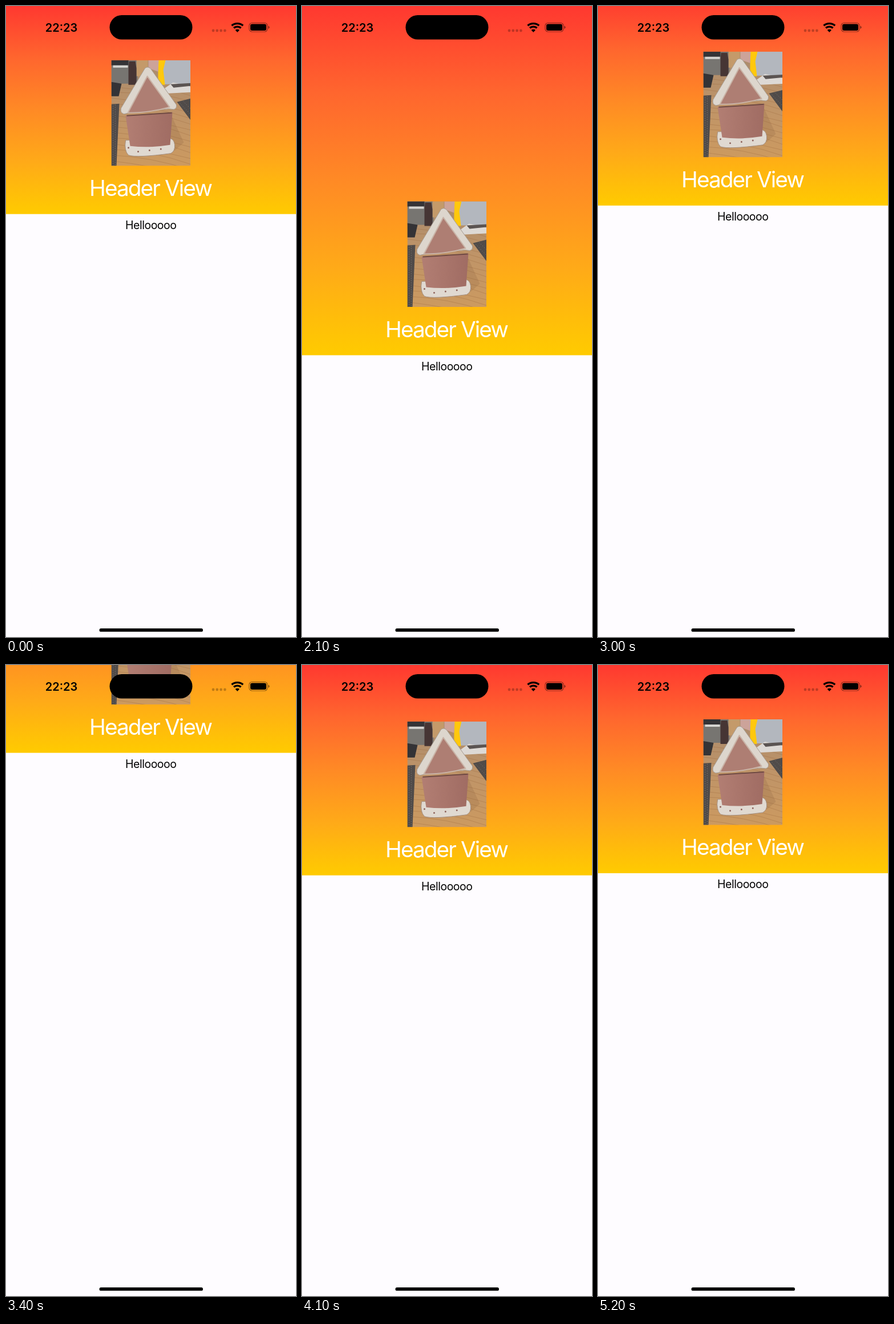
An HTML page for the animation above (5.3 s loop, 508 px wide and 1103 px high).

```html
<!DOCTYPE html>
<html lang="en">
<head>
<meta charset="utf-8">
<title>Stretchy header</title>
<style>
  html, body { margin: 0; width: 100%; height: 100%; overflow: hidden; background: #fefcff; }
  svg { display: block; width: 508px; height: 1103px; }
  text { font-family: Inter, "Liberation Sans", sans-serif; text-anchor: middle; }
  .title { font-size: 38.8px; fill: #fff; letter-spacing: -.05em; }
  .body { font-size: 19.5px; letter-spacing: -.025em; }
  .clock { font-size: 20px; font-weight: 600; }
</style>
</head>
<body>
<svg viewBox="0 0 508 1103">
  <defs>
    <linearGradient id="sunset" x2="0" y2="1">
      <stop stop-color="#ff3830"/><stop offset=".25" stop-color="#ff662e"/>
      <stop offset=".5" stop-color="#ff8a25"/><stop offset=".75" stop-color="#ffaa18"/>
      <stop offset="1" stop-color="#ffcb00"/>
    </linearGradient>
    <linearGradient id="wood" x2="0" y2="1">
      <stop stop-color="#a98a6c"/><stop offset=".5" stop-color="#bf9468"/><stop offset="1" stop-color="#cc9a60"/>
    </linearGradient>
    <linearGradient id="wall" x2="1" y2="0">
      <stop stop-color="#b27e73"/><stop offset="1" stop-color="#a06c63"/>
    </linearGradient>
    <clipPath id="crop"><path d="M0 0h138.5v184.5H0z"/></clipPath>
  </defs>

  <rect id="backdrop" width="508" fill="url(#sunset)"/>
  <g id="content">
    <g transform="translate(184.5 94.7)" clip-path="url(#crop)">
      <path fill="url(#wood)" d="M0 0h139v185H0z"/>
      <g id="grain" fill="none" stroke="#98663a" stroke-opacity=".35"/>
      <path fill="#777571" d="M0 0h46v41H0z"/>
      <path fill="#343336" d="M0 0h30v9H0zM0 38l18 3-5 22H0z"/>
      <path fill="#d5d4d0" d="M3 9h26v4H3z"/>
      <path fill="#c49a6a" d="M44 0h20v28H44z"/>
      <path fill="#b3b7be" d="M92 0h47v42H88z"/>
      <path fill="#ffc80d" d="M82 0h13l-4 17 3 26H82z"/>
      <path fill="#463534" d="M31 2h11l2 12v29H30V14z"/>
      <path fill="#ddd9d5" d="M92 50l16-11 31 7v10l-39 2z"/>
      <path fill="#5b5452" d="M104 42l35-2v5l-30 3z"/>
      <path fill="#504b49" d="M115 73l24-6v38zM0 77l14-1-5 109H0z"/>
      <path fill="none" stroke="#85807d" stroke-dasharray="1 3" d="M3 80v105M7 78v107M120 75l19 20M126 72l13 13"/>
      <path fill="#cca39a" d="M65 0h18l-1 20-17-6z"/>
      <path fill="#80593d" fill-opacity=".2" d="M105 96l22 48-16 14-8-10z"/>
      <path fill="#e0d9d1" stroke="#a38c7b" d="M25 140q-3 18 5 26 14 5 74-3 8-4 7-15-1-9-7-11z"/>
      <path fill="url(#wall)" d="M25 97l82-6-4 57q-36 6-70 2z"/>
      <path fill="none" stroke="#6f4a43" stroke-width="2" d="M27 97l79-5"/>
      <path fill="#ddd6cd" stroke="#a69b91" d="M59 14q5-4 10 1l45 63q1 7-5 8l-8-1-68 7-11 2q-7-2-5-10z"/>
      <path fill="#ae7e73" stroke="#c9b3a6" stroke-width="2" stroke-linejoin="round" d="M63 28l39 54q-34 10-73 10z"/>
      <path fill="none" stroke="#8d625b" stroke-width="3" stroke-linecap="round" stroke-dasharray="0 20" d="M30 153q2 8 16 7l60-7"/>
    </g>
    <text class="title" x="253" y="332">Header View</text>
    <text class="body" x="253.8" y="390">Hellooooo</text>
  </g>

  <text class="clock" x="97" y="45">22:23</text>
  <rect x="181.5" y="16" width="145" height="42.5" rx="21.25"/>
  <path stroke="#000" stroke-opacity=".25" stroke-width="4.8" stroke-linecap="round" stroke-dasharray="0 6.8" d="M363 43h21"/>
  <path fill="none" stroke="#000" stroke-width="3.4" d="M395.4 34.3a15.2 15.2 0 0 1 19.8 0M399 38.4a9.7 9.7 0 0 1 12.6 0"/>
  <path d="M401.6 42.1a5.4 5.4 0 0 1 7.4 0l-3.7 3.9z"/>
  <rect x="426" y="29.5" width="32" height="15.5" rx="5" fill="none" stroke="#000" stroke-opacity=".45" stroke-width="1.2"/>
  <rect x="428" y="31.4" width="28" height="11.6" rx="3.2"/>
  <path fill-opacity=".5" d="M459.5 34.5q2 1 2 2.7t-2 2.7z"/>
  <rect x="163.5" y="1088" width="181.5" height="5.8" rx="2.9"/>
</svg>
<script>
  const LOOP = 5300, STEP = 100, HEADER = 363.7, STIFFNESS = .0128;
  const $ = id => document.getElementById(id);

  const easeOut = p => 1 - (1 - p) ** 2.74;
  const smooth = p => p * p * (3 - 2 * p);

  // Each drag is followed by a critically damped spring back to rest.
  const pulls = [
    { start: 1600, end: 2300, release: 2358, by: 255, ease: easeOut },
    { start: 2900, end: 3550, release: 3570, by: -243, ease: smooth },
    { start: 4070, end: 4420, release: 4459, by: 296, ease: smooth },
  ];

  function pullAt(t, { start, end, release, by, ease }) {
    if (t <= start) return 0;
    if (t < release) return by * ease(Math.min(1, (t - start) / (end - start)));
    const u = (t - release) * STIFFNESS;
    return by * (1 + u) * Math.exp(-u);
  }

  function offsetAt(t) {
    return t < 1700 ? 0 : pulls.reduce((sum, pull) => sum + pullAt(t, pull), 0);
  }

  function drawGrain() {
    let d = "";
    for (let i = 0; i < 16; i++) {
      const y = 48 + i * 10;
      d += `M0 ${y - 12}Q70 ${y - 8 + 5 * Math.sin(i * 2.4)} 139 ${y + 14}`;
    }
    $("grain").innerHTML = `<path d="${d}"/>`;
  }

  function draw(now) {
    const t = Math.floor(now % LOOP / STEP) * STEP;
    const offset = offsetAt(t);
    const top = Math.min(0, offset);
    $("backdrop").setAttribute("y", top);
    $("backdrop").setAttribute("height", HEADER + offset - top);
    $("content").setAttribute("transform", `translate(0 ${offset})`);
  }

  function tick() {
    draw(performance.now());
    requestAnimationFrame(tick);
  }

  drawGrain();
  tick();
</script>
</body>
</html>
```
